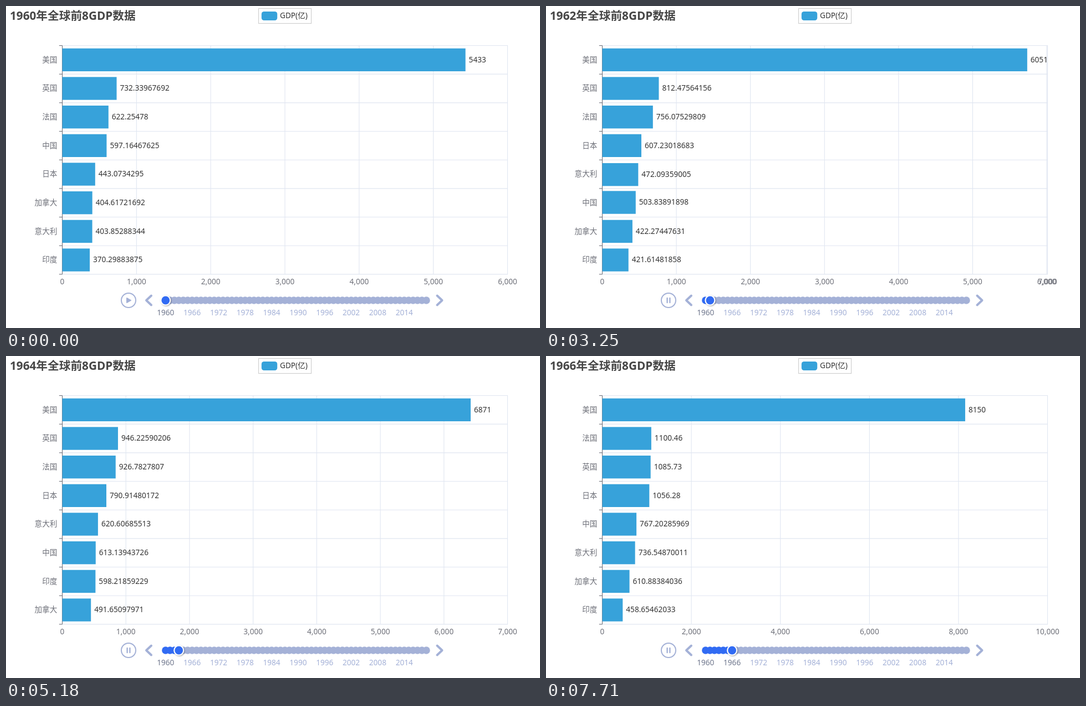
These frames come from a looping animation (963x582 px, 8000 ms). An HTML page with a canvas:

```html
<!DOCTYPE html>
<html lang="zh-CN">
<head>
<meta charset="utf-8">
<title>GDP</title>
<style>
html, body { margin: 0; width: 100%; height: 100%; overflow: hidden; background: #fff; }
canvas { display: block; }
</style>
</head>
<body>
<canvas width="963" height="582"></canvas>
<script>
const ctx = document.querySelector('canvas').getContext('2d');

const LOOP = 8000, PLAY_AT = 1180, FIRST_CHANGE = 2177, INTERVAL = 1000;
const LEFT = 101.5, RIGHT = 904.5, TOP = 71.5, ROW = 51.67, ROWS = 8;
const BOTTOM = TOP + ROW * ROWS;
const TRACK_X = 287.8, TRACK_Y = 532, YEAR_STEP = 7.97, YEARS = 60;
const BAR = '#37a2da', GREY = '#6e7079', GRID = '#e0e6f1', PALE = '#a4b1d7', BLUE = '#316bf3';
const FAMILY = '"Noto Sans", "Noto Sans CJK SC", "Noto Sans CJK", sans-serif';

const clamp = v => Math.max(0, Math.min(1, v));
const lerp = (a, b, p) => a + (b - a) * p;
const easeInOut = (t, n) => t < 0.5 ? (2 * t) ** n / 2 : 1 - (2 - 2 * t) ** n / 2;

// Each economy follows a cubic through its values in four key years
const KEY_YEARS = [0, 2, 5, 6];
const economies = {
  '美国': [5433, 6051, 7437, 8150],
  '英国': [732.33967692, 812.47564156, 1018.25, 1085.73],
  '法国': [622.25478, 756.07529809, 1015.37, 1100.46],
  '中国': [597.16467625, 472.09359005, 704.36266146, 767.20285969],
  '日本': [443.0734295, 607.23018683, 909.50278257, 1056.28],
  '加拿大': [404.61721692, 422.27447631, 545.1517958, 610.88384036],
  '意大利': [403.85288344, 503.83891898, 679.7815385, 736.54870011],
  '印度': [370.29883875, 421.61481858, 595.54854574, 458.65462033]
};
const names = Object.keys(economies);

function gdp(name, year) {
  const value = economies[name].reduce((sum, v, i) => sum + KEY_YEARS.reduce(
    (w, k, j) => j === i ? w : w * (year - k) / (KEY_YEARS[i] - k), v), 0);
  return +value.toFixed(value < 1000 ? 8 : value < 5000 ? 2 : 0);
}

const years = Array.from({ length: 7 }, (_, i) => {
  const values = Object.fromEntries(names.map(name => [name, gdp(name, i)]));
  const order = [...names].sort((a, b) => values[b] - values[a]);
  const top = values[order[0]];
  const step = top / 5 < 1500 ? 1000 : 2000;
  return { values, order, step, max: Math.ceil(top / step) * step };
});

const valueX = (value, year) => LEFT + Math.min(1, value / year.max) * (RIGHT - LEFT);

function text(str, x, y, color, align = 'left', font = '13.6px') {
  ctx.font = `${font} ${FAMILY}`;
  ctx.textAlign = align;
  ctx.fillStyle = color;
  ctx.fillText(str, x, y);
}

function stroke(points, color, width = 1.1) {
  ctx.beginPath();
  points.forEach(([x, y]) => ctx.lineTo(x, y));
  ctx.strokeStyle = color;
  ctx.lineWidth = width;
  ctx.stroke();
}

function disc(x, y, r, color) {
  ctx.beginPath();
  ctx.arc(x, y, r, 0, 7);
  ctx.fillStyle = color;
  ctx.fill();
}

function drawHeader(index) {
  text(`${1960 + index}年全球前8GDP数据`, 7, 25, '#464646', 'left', 'bold 20.7px');
  ctx.strokeStyle = '#ccc';
  ctx.lineWidth = 1.1;
  ctx.strokeRect(455.5, 4.5, 95, 27);
  ctx.fillStyle = BAR;
  ctx.beginPath();
  ctx.roundRect(460.8, 10, 28.4, 16, 4.5);
  ctx.fill();
  text('GDP(亿)', 494, 22, '#333');
}

function drawChart(index, p) {
  const now = years[index], before = years[Math.max(0, index - 1)];

  for (let i = 0; i <= ROWS; i++) {
    const y = TOP + i * ROW;
    stroke([[LEFT, y], [RIGHT + 0.5, y]], GRID);
  }
  for (let v = 0; v <= now.max; v += now.step) {
    const x = lerp(valueX(v, before), valueX(v, now), p);
    stroke([[x, TOP], [x, BOTTOM]], GRID);
    text(v.toLocaleString('en-US'), x, 503.4, GREY, 'center');
  }

  stroke([[LEFT, TOP], [LEFT, BOTTOM]], GREY);
  for (let i = 0; i <= ROWS; i++) {
    const y = TOP + i * ROW;
    stroke([[LEFT - 5.7, y], [LEFT, y]], GREY);
  }
  now.order.forEach((name, i) => text(name, 92.4, TOP + (i + 0.5) * ROW + 4.2, GREY, 'right'));

  const bars = names.map(name => ({
    value: now.values[name],
    y: TOP + ROW * lerp(before.order.indexOf(name), now.order.indexOf(name), p),
    end: lerp(valueX(before.values[name], before), valueX(now.values[name], now), p)
  }));
  ctx.fillStyle = BAR;
  bars.forEach(b => ctx.fillRect(LEFT, b.y + ROW * 0.1, b.end - LEFT, ROW * 0.8));
  bars.forEach(b => text(b.value, b.end + 6, b.y + ROW / 2 + 4.2, '#333'));
}

function drawControls(playing) {
  ctx.beginPath();
  ctx.arc(221, TRACK_Y, 13, 0, 7);
  ctx.strokeStyle = PALE;
  ctx.lineWidth = 2;
  ctx.stroke();

  ctx.lineCap = ctx.lineJoin = 'round';
  if (playing) {
    for (const x of [218.6, 223.4]) stroke([[x, 528], [x, 536]], PALE, 2.4);
  } else {
    ctx.beginPath();
    for (const [x, y] of [[218, 528], [225, 532], [218, 536]]) ctx.lineTo(x, y);
    ctx.closePath();
    ctx.fillStyle = PALE;
    ctx.fill();
    ctx.stroke();
  }
  stroke([[262, 523.5], [253, 532], [262, 540.5]], PALE, 4);
  stroke([[777.5, 523.5], [786.5, 532], [777.5, 540.5]], PALE, 4);
  ctx.lineCap = 'butt';
  ctx.lineJoin = 'miter';
}

function drawTimeline(index, p) {
  for (let i = 0; i < YEARS; i++) {
    const x = TRACK_X + i * YEAR_STEP;
    disc(x, TRACK_Y, 6.7, i < index ? BLUE : PALE);
    if (i % 6 === 0 && i < 56) {
      text(1960 + i, x, 558.6, i <= index ? '#6f778d' : PALE, 'center');
    }
  }
  const x = TRACK_X + lerp(Math.max(0, index - 1), index, p) * YEAR_STEP;
  ctx.save();
  ctx.shadowColor = 'rgba(0,0,0,.3)';
  ctx.shadowBlur = 2.3;
  ctx.shadowOffsetX = ctx.shadowOffsetY = 1.1;
  disc(x, TRACK_Y, 9.6, '#fff');
  ctx.restore();
  disc(x, TRACK_Y, 7.4, BLUE);
}

function draw(time) {
  const t = time % LOOP;
  const index = Math.max(0, Math.floor((t - FIRST_CHANGE) / INTERVAL) + 1);
  const since = index ? t - FIRST_CHANGE - (index - 1) * INTERVAL : INTERVAL;

  ctx.fillStyle = '#fff';
  ctx.fillRect(0, 0, 963, 582);
  drawHeader(index);
  drawChart(index, easeInOut(clamp(since / 500), 3));
  drawControls(t >= PLAY_AT);
  drawTimeline(index, easeInOut(clamp(since / 300), 5));
}

function frame() {
  draw(performance.now());
  requestAnimationFrame(frame);
}
frame();
</script>
</body>
</html>
```
